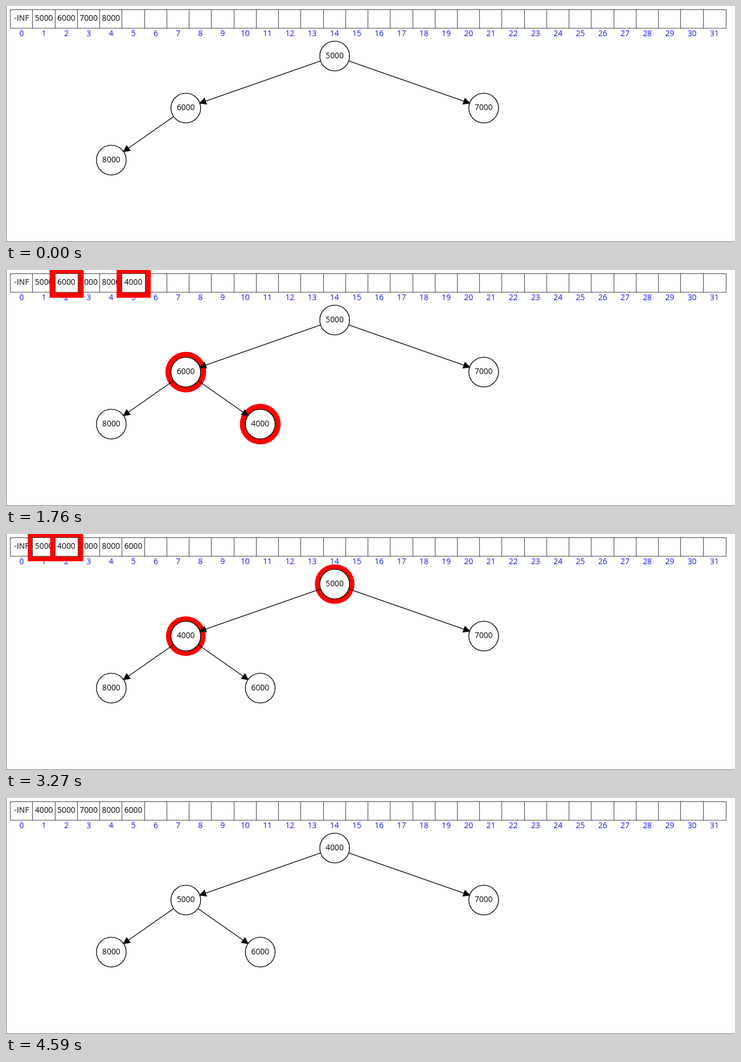
An HTML page with a canvas for the animation above (8000 ms loop, 1280 by 415 pixels).

```html
<!DOCTYPE html>
<html lang="en">
<head>
<meta charset="utf-8">
<title>Heap insertion</title>
<style>
  html, body { margin: 0; width: 100%; height: 100%; overflow: hidden; background: #fff; }
  canvas { display: block; width: 1280px; height: 415px; }
</style>
</head>
<body>
<canvas id="stage" width="1280" height="415"></canvas>
<script>
const ctx = document.getElementById('stage').getContext('2d');
const LOOP = 8000;
const SCALE = 1.307;
// Each cell is a little wider than the pitch, so the next one covers its right edge.
const CELL = { x: 7.7, y: 6.5, w: 40.5, h: 32.6, pitch: 39.24, count: 32 };
const RADIUS = 26.1;
const RED = '#f00', INK = '#000', BLUE = '#1414ff';

// Heap positions of the tree nodes; index 0 is the sentinel.
const NODES = [null, [577.1, 88], [315.7, 179.5], [838.7, 179.5], [184.9, 271], [446.4, 271]];
const LABEL_START = [157, 26];

// The picture is only refreshed at these times.
const TICKS = [0, 500, 650, 800, 920, 1070, 1190, 1310, 1460, 1610, 1760, 1890, 2030, 2160,
  2310, 2460, 2580, 2730, 2880, 3030, 3150, 3270, 3420, 3540, 3660, 3780, 3930, 4080,
  4200, 4350, 4470, 4590];

// "move" lists [time, progress] pairs, linear in between.
const PHASES = [
  { at: 0, heap: [5000, 6000, 7000, 8000] },
  { at: 500, heap: [5000, 6000, 7000, 8000, ''], insert: 4000,
    move: [[500, .08], [650, .284], [1262, 1]] },
  { at: 1262, heap: [5000, 6000, 7000, 8000, 4000], glow: [2, 5] },
  { at: 2060, heap: [5000, 6000, 7000, 8000, 4000], swap: [2, 5],
    move: [[2060, 0], [2914, 1]] },
  { at: 2914, heap: [5000, 4000, 7000, 8000, 6000], glow: [1, 2] },
  { at: 3775, heap: [5000, 4000, 7000, 8000, 6000], swap: [1, 2],
    move: [[3780, 0], [3930, .19], [4578, 1]] },
  { at: 4578, heap: [4000, 5000, 7000, 8000, 6000] }
];

const mix = (a, b, p) => a + (b - a) * p;
const between = (a, b, p) => [mix(a[0], b[0], p), mix(a[1], b[1], p)];
const cellText = i => [CELL.x + CELL.pitch * i + 19.7, 21.4];
const nodeText = i => [NODES[i][0], NODES[i][1] - 1.4];

function progress(keys, t) {
  if (t <= keys[0][0]) return keys[0][1];
  for (let k = 1; k < keys.length; k++) {
    const [t0, p0] = keys[k - 1], [t1, p1] = keys[k];
    if (t <= t1) return mix(p0, p1, (t - t0) / (t1 - t0));
  }
  return 1;
}

// Highlight border: a triangle wave between 3 and 7 units.
function glowWidth(t) {
  const period = 1668, peak = 1765;
  const phase = (((t - peak) % period) + period) % period;
  const away = Math.min(phase, period - phase) / (period / 2);
  return (7 - 4 * away) * SCALE + .6;
}

function text(value, [x, y], color = INK) {
  ctx.fillStyle = color;
  ctx.fillText(value, x, y + 4.9);
}

function drawCell(i, value, glow = 0) {
  const left = CELL.x + CELL.pitch * i, { y, w, h } = CELL;
  const x = Math.floor(left) + .5, right = Math.floor(left + w) + .5;
  if (glow) {
    ctx.fillStyle = RED;
    ctx.fillRect(left - glow, y - glow, w + 2 * glow, h + 2 * glow);
  }
  ctx.fillStyle = '#fff';
  ctx.fillRect(x, y, right - x, h);
  ctx.lineWidth = 1;
  ctx.strokeStyle = '#444';
  ctx.strokeRect(x, y, right - x, h);
  text(value, cellText(i));
}

function disc([x, y], r, color) {
  ctx.beginPath();
  ctx.arc(x, y, r, 0, Math.PI * 2);
  ctx.fillStyle = color;
  ctx.fill();
}

function drawNode(i, value, glow) {
  if (glow) disc(NODES[i], RADIUS + glow, RED);
  disc(NODES[i], RADIUS, '#fff');
  ctx.lineWidth = SCALE;
  ctx.strokeStyle = INK;
  ctx.stroke();
  text(value, nodeText(i));
}

function drawEdge(from, to) {
  const angle = Math.atan2(to[1] - from[1], to[0] - from[0]);
  const length = Math.hypot(to[0] - from[0], to[1] - from[1]) - RADIUS;
  ctx.save();
  ctx.translate(...from);
  ctx.rotate(angle);
  ctx.lineWidth = SCALE;
  ctx.strokeStyle = ctx.fillStyle = INK;
  ctx.beginPath();
  ctx.moveTo(RADIUS, 0);
  ctx.lineTo(length, 0);
  ctx.stroke();
  ctx.beginPath();
  ctx.moveTo(length, 0);
  ctx.lineTo(length - 8 * SCALE, -4 * SCALE);
  ctx.lineTo(length - 8 * SCALE, 4 * SCALE);
  ctx.closePath();
  ctx.fill();
  ctx.stroke();
  ctx.restore();
}

function drawSwap([a, b], heap, p) {
  for (const [i, j] of [[a, b], [b, a]]) {
    text(heap[i - 1], between(cellText(i), cellText(j), p));
    text(heap[i - 1], between(nodeText(i), nodeText(j), p));
  }
}

function draw(t) {
  const { heap, glow = [], swap = [], insert, move } = PHASES.findLast(s => s.at <= t);
  const p = move ? progress(move, t) : 0;
  const shown = i => i === 0 ? '-INF' : swap.includes(i) ? '' : heap[i - 1] ?? '';

  ctx.fillStyle = '#fff';
  ctx.fillRect(0, 0, 1280, 415);
  ctx.fillStyle = '#777';
  ctx.fillRect(0, 0, 1, 415);
  ctx.fillRect(0, 414, 1280, 1);
  ctx.font = '13.8px "Open Sans", "Noto Sans", sans-serif';
  ctx.textAlign = 'center';

  for (let i = 0; i < CELL.count; i++) {
    drawCell(i, shown(i));
    text(i, [cellText(i)[0], 47.8], BLUE);
  }
  for (let i = 1; i <= heap.length; i++) drawNode(i, shown(i));
  for (const i of glow) {
    drawCell(i, shown(i), glowWidth(t));
    drawNode(i, shown(i), glowWidth(t));
  }
  for (let i = 2; i <= heap.length; i++) drawEdge(NODES[i >> 1], NODES[i]);

  if (insert) text(insert, between(LABEL_START, nodeText(5), p));
  if (swap.length) drawSwap(swap, heap, p);
}

const start = performance.now();
function frame() {
  const t = (performance.now() - start) % LOOP;
  draw(TICKS.findLast(tick => tick <= t));
  requestAnimationFrame(frame);
}
frame();
</script>
</body>
</html>
```
